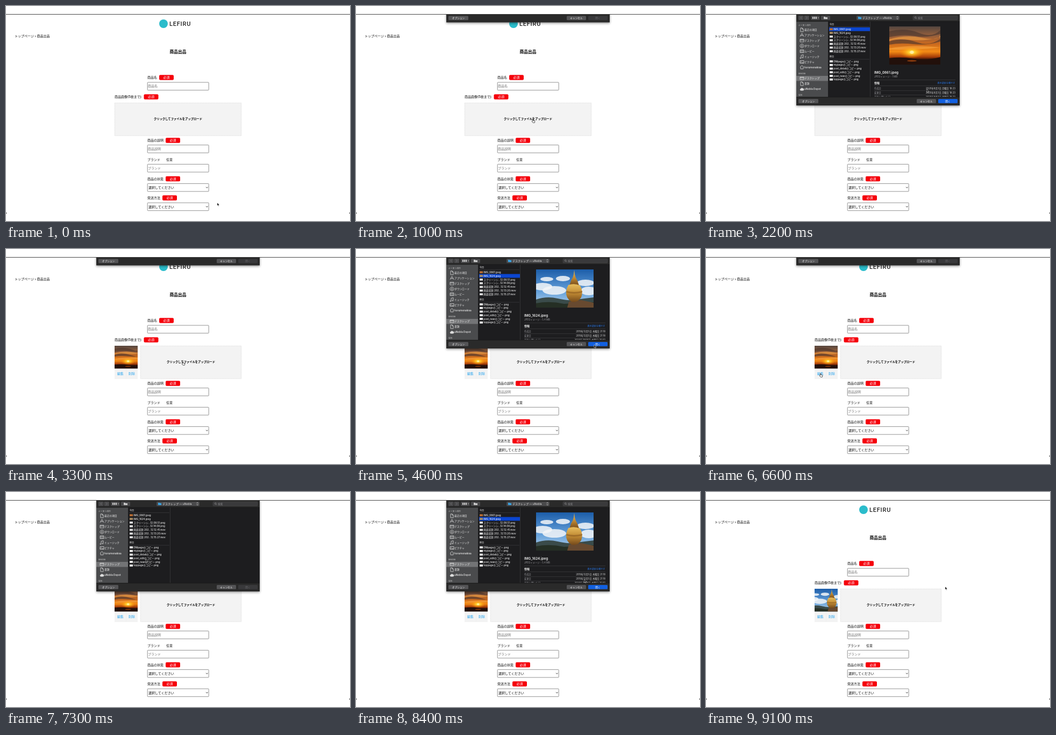
These frames come from a looping animation (640 px wide and 400 px high, 9.3 s). An HTML page:

```html
<!DOCTYPE html>
<html lang="ja">
<head>
<meta charset="utf-8">
<title>商品出品</title>
<style>
html, body { margin: 0; width: 100%; height: 100%; overflow: hidden; background: #fff; }
svg { display: block; font-family: Inter, "Noto Sans CJK JP", sans-serif; }
text { white-space: pre; }
</style>
</head>
<body>
<svg id="stage" width="640" height="400" viewBox="0 0 640 400"></svg>
<script>
const rect = (x, y, w, h, fill, more = '') =>
  `<rect x="${x}" y="${y}" width="${w}" height="${h}" fill="${fill}" ${more}/>`;
// y is the middle of the line
const text = (x, y, s, size, fill = '#111', weight = 500, anchor = 'start', more = '') =>
  `<text x="${x}" y="${y + size * .37}" font-size="${size}" fill="${fill}" font-weight="${weight}" text-anchor="${anchor}" ${more}>${s}</text>`;
const path = (d, fill, more = '') => `<path d="${d}" fill="${fill}" ${more}/>`;
const oval = (x, y, rx, ry, fill, more = '') =>
  `<ellipse cx="${x}" cy="${y}" rx="${rx}" ry="${ry}" fill="${fill}" ${more}/>`;
const group = (id, body, more = '') => `<g id="${id}" ${more}>${body}</g>`;
const gradient = (id, stops) => `<linearGradient id="${id}" x2="0" y2="1">` +
  stops.map(([o, c]) => `<stop offset="${o}" stop-color="${c}"/>`).join('') + '</linearGradient>';
const photo = (id, x, y, w, h) => `<use href="#${id}" x="${x}" y="${y}" width="${w}" height="${h}"/>`;

const defs = `<defs>
${gradient('dusk', [[0, '#54463f'], [.25, '#98603c'], [.45, '#c8681f'], [.66, '#f38b16'], [.8, '#a53c08'], [.87, '#2c1008'], [1, '#160a08']])}
${gradient('sky', [[0, '#1c5da9'], [.6, '#68a3dc'], [1, '#b9d3e8']])}
${gradient('gold', [[0, '#e7bd5e'], [.5, '#c08a33'], [1, '#74491b']])}
<radialGradient id="glow"><stop stop-color="#fff3a0"/><stop offset=".25" stop-color="#ffd02e"/><stop offset="1" stop-color="#ff8a00" stop-opacity="0"/></radialGradient>
<filter id="shade" x="-10%" y="-10%" width="120%" height="120%"><feDropShadow dx="0" dy="1.5" stdDeviation="2" flood-opacity=".45"/></filter>
<clipPath id="below"><rect y="15.5" width="640" height="385"/></clipPath>
<clipPath id="info"><rect x="305" y="29" width="167" height="140"/></clipPath>
<symbol id="sunset" viewBox="0 0 95 71" preserveAspectRatio="xMinYMid slice">
${rect(0, 0, 95, 71, 'url(#dusk)')}
${path('M0 9Q30 2 55 12T95 7V14Q70 22 48 18T0 20ZM0 28Q25 20 50 29T95 23V28Q70 36 45 33T0 34Z', '#46342d', 'opacity=".6"')}
${path('M0 24Q30 15 60 21T95 17V20Q65 28 38 25T0 27ZM0 41Q40 33 95 39Q60 44 0 43Z', '#ffac45', 'opacity=".55"')}
${oval(42, 48, 23, 11, 'url(#glow)')}${oval(42, 48, 3.5, 3, '#fff0a0')}
${path('M0 59Q22 56 45 60T95 57V71H0Z', '#22100b')}${oval(42, 64, 9, 1.5, '#d45a10', 'opacity=".6"')}
</symbol>
<symbol id="rock" viewBox="0 0 107 71" preserveAspectRatio="xMidYMid slice">
${rect(0, 0, 107, 71, 'url(#sky)')}
${[[12, 32, 18, 7], [34, 39, 22, 8], [20, 18, 12, 4], [50, 17, 13, 5], [92, 25, 16, 6], [98, 40, 15, 8]].map(c => oval(...c, '#f4f6f8', 'opacity=".85"')).join('')}
${path('M0 56Q20 49 40 54T75 56L107 52V71H0Z', '#3a4b4a')}
${path('M0 63Q25 58 52 64L107 61V71H0Z', '#252f25')}
${path('M58 71L61 60L84 57L107 62V71Z', '#684a30')}
${path('M71 1L72 9Q73 15 77 21L80 30H62L65 21Q69 15 70 9Z', 'url(#gold)')}
${path('M60 29Q71 25 82 30Q88 41 84 52Q77 63 66 60Q55 54 56 41Q57 34 60 29Z', 'url(#gold)')}
${path('M57 40Q70 44 86 40V43Q70 47 56 43Z', '#8b5a20', 'opacity=".6"')}
</symbol></defs>`;

// ---- page ----
const badge = (x, y) => rect(x, y - 4.7, 27, 9.4, '#f5000b', 'rx="2"') +
  text(x + 13.5, y, '必須', 6, '#fff', 400, 'middle');
const field = y => rect(263.2, y - 7.2, 114, 14.6, '#fff', 'rx="1" stroke="#777" stroke-width=".8"');
const input = (y, hint) => field(y) + text(264, y, hint, 6, '#757575', 400);
const select = y => field(y) + text(265, y, '選択してください', 6, '#000') +
  path(`M372.2 ${y - .9}l1.7 1.8l1.7-1.8`, 'none', 'stroke="#222" stroke-width=".9"');
const page =
  rect(0, 15, 640, .9, '#333') +
  path('M0 383.5Q.3 385.7 2.3 386H0ZM640 383.5Q639.7 385.7 637.7 386H640Z', '#000') +
  oval(293, 33, 8, 8, '#2bbccb') +
  text(304, 33.3, 'LEFIRU', 11, '#222', 500, 'start', 'font-family="Roboto, sans-serif" letter-spacing=".8"') +
  text(16, 55.5, 'トップページ › 商品出品', 6) +
  text(320, 85.5, '商品出品', 7.7, '#000', 700, 'middle') +
  text(263, 133, '商品名', 6) + badge(285, 133) + input(149.2, '商品名') +
  text(202, 169, '商品画像(5枚まで)', 6) + badge(256.5, 169) +
  text(263, 250, '商品の説明', 6) + badge(297, 250) + input(265.8, '商品説明') +
  text(263, 285.5, 'ブランド', 6) + text(298, 285.5, '任意', 6) + input(301.6, 'ブランド') +
  text(263, 321.5, '商品の状態', 6) + badge(297, 321.5) + select(337.6) +
  text(263, 357, '発送方法', 6) + badge(291, 357) + select(373.3);

const thumb = (id, name, x) => group(id,
  rect(x, 180, 43, 61.5, '#f3f3f3') + photo(name, x, 180, 43, 42.5) +
  path(`M${x} 241.3h43M${x + 21.5} 223v18`, 'none', 'stroke="#e6e6e6" stroke-width=".5"') +
  text(x + 10.7, 232, '編集', 6, '#2ba5ee', 500, 'middle') +
  text(x + 32, 232, '削除', 6, '#2ba5ee', 500, 'middle'));
const uploads = [0, 1, 2].map(n => {
  const x = 202 + 48 * n;
  return group('up' + n,
    rect(x + .3, 180.3, 235.4 - 48 * n, 61, '#f3f3f3', 'stroke="#ccc" stroke-width=".6" stroke-dasharray="1.5 1"') +
    text((x + 438) / 2, 210.5, 'クリックしてファイルをアップロード', 5.3, '#000', 700, 'middle'));
}).join('');

// ---- file dialog ----
const button = (x, w, label, fill = '#545456', color = '#eee') =>
  rect(x, 173, w, 7.8, fill, 'rx="1.5"') + text(x + w / 2, 176.9, label, 4.7, color, 500, 'middle');
const tool = (x, w) => rect(x, 18, w, 8, '#49494b', 'rx="1.5"');
const line = (x, y, w) => rect(x, y, w, .5, '#48484a');
const icons = {
  doc: 'M1 0H4L6 2V7H1ZM4 0V2H6', app: 'M0 6L3.5 0L7 6M1 4H6', desk: 'M0 1H7V6H0ZM0 2.5H7',
  down: 'M3.5 0A3.5 3.5 0 1 0 3.6 0ZM3.5 1.5V5M2 3.5L3.5 5L5 3.5', film: 'M0 1H7V6H0ZM2 1V6M5 1V6',
  note: 'M2 6V1L6 0V5M2 6A1 1 0 1 1 1 5M6 5A1 1 0 1 1 5 4', pic: 'M0 1H7V6H0ZM0 5L2 3L4 5L5 4L7 6',
  home: 'M0 3.5L3.5 0L7 3.5M1 3V6.5H6V3', cloud: 'M2 6A1.5 1.5 0 0 1 1.5 3A2 2 0 0 1 5 2.5A1.7 1.7 0 0 1 5.5 6Z'
};
const place = ([icon, label], y) =>
  path(icons[icon], icon === 'cloud' ? '#ddd' : 'none', `transform="translate(175 ${y - 3.5})" stroke="#ddd" stroke-width=".8"`) +
  text(183, y, label, 4.7, '#eee');
const places = [['doc', '最近の項目'], ['app', 'アプリケーション'], ['desk', 'デスクトップ'], ['down', 'ダウンロード'],
  ['film', 'ムービー'], ['note', 'ミュージック'], ['pic', 'ピクチャ'], ['home', 'horumenakisa']];
const synced = [['desk', 'デスクトップ'], ['doc', '書類'], ['cloud', 'uNebla Depot']];
const today = ['IMG_0861.jpeg', 'IMG_1624.jpeg', 'スクリーンシ…12.08.51.png', 'スクリーンシ…12.14.08.png',
  '画面収録 202…12.12.41.mov', '画面収録 202…12.13.20.mov', '画面収録 202…12.15.27.mov'];
const older = ['DMpage', 'mypage', 'post_detail', 'post_edit', 'post_new', 'toppage'].map(s => s + 'のコピー.png');
const file = (name, y, fill) => rect(230, y - 1.9, 6, 3.8, fill) + text(237.3, y, name, 4.6, '#eee');
const rowY = i => 43.2 + 6.83 * i;

const preview = (id, i, name, x, w, size, dates) => group('pick' + i,
  rect(229, rowY(i) - 3.5, 76, 7, '#0b45cf') +
  `<g clip-path="url(#info)">` + photo(id, x, 38, w, 71) +
  text(313, 123.8, name, 6.3, '#eee', 600) +
  text(313, 131.8, 'JPEGイメージ - ' + size, 4.4, '#98989c', 400) + line(313, 137, 151) +
  text(313, 143.3, '情報', 5, '#eee', 700) +
  text(463.5, 143.3, '表示項目を増やす', 4.15, '#2878ec', 500, 'end') + line(313, 148.5, 151) +
  ['作成日', '変更日', '最後に開いた日'].map((label, k) =>
    text(313, 153.4 + 7.9 * k, label, 4.3, '#98989c', 400) +
    text(464, 153.4 + 7.9 * k, dates[k], 4.3, '#ddd', 400, 'end') + line(313, 157.4 + 7.9 * k, 151)).join('') +
  '</g>' + button(432, 36, '開く', '#1260e0', '#fff'));

const day1 = '2020年8月3日 月曜日 18:23', day2 = '2019年12月5日 木曜日 21:18';
const dialog =
  rect(168, 15, 304, 170, '#29292b', 'filter="url(#shade)"') +
  rect(168, 29, 59, 140, '#4a4b4d') + rect(227, 29, 245, 140, '#1d1d1f') +
  rect(168, 28.6, 304, .5, '#111') + rect(168, 169, 304, .6, '#111') + rect(305, 29, .6, 140, '#414143') +
  tool(172, 9.5) + tool(182.5, 9.5) + tool(195, 16.5) + tool(214, 17) + tool(280, 80) +
  path('M178 20.2l-2 1.8l2 1.8M186.4 20.2l2 1.8l-2 1.8', 'none', 'stroke="#808083" stroke-width=".7"') +
  path('M198 20h2v4h-2zM201 20h2v4h-2zM204 20h2v4h-2zM207.5 21.5h2.6l-1.3 1.4zM219 20h2.5l.8 1h3.7v3.3h-7z', '#ccc') +
  path('M283 20h2.4l.7.8h3v3.5h-6.1z', '#3aa5e6') +
  text(291, 22, 'デスクトップ — uNebla', 5, '#e8e8e8', 400) +
  path('M354.6 21.2l1.4-1.7l1.4 1.7M354.6 22.8l1.4 1.7l1.4-1.7', 'none', 'stroke="#ddd" stroke-width=".7"') +
  rect(385, 18, 83, 8, '#39393b', 'rx="1.5" stroke="#555" stroke-width=".4"') +
  path('M389.6 20A1.5 1.5 0 1 0 389.7 20ZM390.7 22.7L392 24', 'none', 'stroke="#aaa" stroke-width=".6"') +
  text(394, 22, '検索', 4.7, '#858588', 400) +
  text(172, 35.5, 'よく使う項目', 3.8, '#bbb') + places.map((p, i) => place(p, 44.4 + 9.95 * i)).join('') +
  text(172, 126, 'uNebla', 3.8, '#bbb') + rect(168, 130, 59, 9.4, '#737476') +
  synced.map((p, i) => place(p, 134.6 + 10 * i)).join('') + text(172, 166, '場所', 3.8, '#bbb') +
  text(230, 34.5, '今日', 4, '#bbb', 600) + line(229, 38.2, 75) + text(230, 95, '昨日', 4, '#bbb', 600) + line(229, 98.8, 75) +
  button(172, 37, 'オプション') + button(392, 36, 'キャンセル') + button(432, 36, '開く', '#39393b', '#68686b') +
  preview('sunset', 0, today[0], 341, 95, '1 MB', [day1, day1, day1]) +
  preview('rock', 1, today[1], 335, 107, '5.4 MB', [day2, day2, '2020年7月16日 木曜日 20:50']) +
  today.map((s, i) => file(s, rowY(i), i == 0 ? '#b76b32' : i == 1 ? '#a58a62' : '#ddd')).join('') +
  older.map((s, i) => file(s, 103 + 6.75 * i, '#eee')).join('');

const pointers =
  group('arrow', path('M0 0V5.6L1.4 4.4L2.4 6.4L3.3 6L2.4 4.1H4Z', '#000', 'stroke="#fff" stroke-width=".5"')) +
  group('hand', path('M-.6 0Q.3-.8.8 0V2.1L3.4 2.8Q4 3 3.8 4L3.3 6.2H.2L-1.8 3.8Q-1.8 2.9-.6 3.3Z', '#fff', 'stroke="#111" stroke-width=".7"'));

const $ = id => document.getElementById(id);
$('stage').innerHTML = defs + page + uploads + thumb('sunA', 'sunset', 202) + thumb('rockA', 'rock', 202) +
  thumb('rockB', 'rock', 250) + `<g clip-path="url(#below)">${group('dialog', dialog)}</g>` + group('pointer', pointers);

// ---- motion ----
const moves = [[0, 393, 366], [700, 329, 211], [1200, 329, 211], [1700, 246, 43], [1900, 246, 43], [2200, 411, 155],
  [2400, 445, 178], [2600, 445, 178], [3000, 329, 210], [3500, 329, 210], [3900, 250, 50], [4100, 250, 50],
  [4500, 443, 178], [4700, 443, 178], [5200, 281, 232], [5800, 281, 232], [6200, 213, 232], [6900, 213, 232],
  [7300, 260, 125], [7700, 250, 50], [8000, 250, 50], [8500, 445, 176], [9300, 445, 176]];
const sheets = [[900, 2600, 1900, 0], [3200, 4700, 4000, 1], [6500, 8600, 7900, 1]]; // open, close, pick time, picked file
const SLIDE = 360;
const clamp = v => Math.min(1, Math.max(0, v));
const smooth = v => v * v * (3 - 2 * v);
const cubic = v => v < .5 ? 4 * v ** 3 : 1 - 4 * (1 - v) ** 3;
const show = (id, on) => $(id).setAttribute('display', on ? 'inline' : 'none');

function draw(t) {
  const sheet = sheets.find(([open, close]) => t > open && t < close + SLIDE);
  show('dialog', sheet);
  if (sheet) {
    const [open, close, pick, index] = sheet;
    const down = cubic(clamp((t - open) / SLIDE)) - cubic(clamp((t - close) / SLIDE));
    $('dialog').setAttribute('transform', `translate(0 ${169 * (down - 1)})`);
    for (const i of [0, 1]) show('pick' + i, t >= pick && i === index);
  }

  const two = t >= 5000 && t < 5700;
  const count = t < 3000 ? 0 : two ? 2 : 1;
  for (const n of [0, 1, 2]) show('up' + n, n === count);
  show('sunA', t >= 3000 && t < 9100);
  show('rockA', t >= 9100);
  show('rockB', two);

  const i = moves.findIndex(m => m[0] > t);
  const [t0, x0, y0] = moves[i - 1], [t1, x1, y1] = moves[i];
  const k = smooth((t - t0) / (t1 - t0));
  const x = x0 + (x1 - x0) * k, y = y0 + (y1 - y0) * k;
  $('pointer').setAttribute('transform', `translate(${x} ${y})`);
  const onUpload = x > 202 + 48 * count && x < 438 && y > 180 && y < 241;
  const onLink = count > 0 && x > 202 && x < 202 + 48 * count && y > 225 && y < 241;
  show('hand', onUpload || onLink);
  show('arrow', !onUpload && !onLink);
}

const start = performance.now();
function tick() {
  const t = (performance.now() - start) % 9300;
  draw(Math.min(9100, Math.floor(t / 100) * 100));
  requestAnimationFrame(tick);
}
tick();
</script>
</body>
</html>
```
